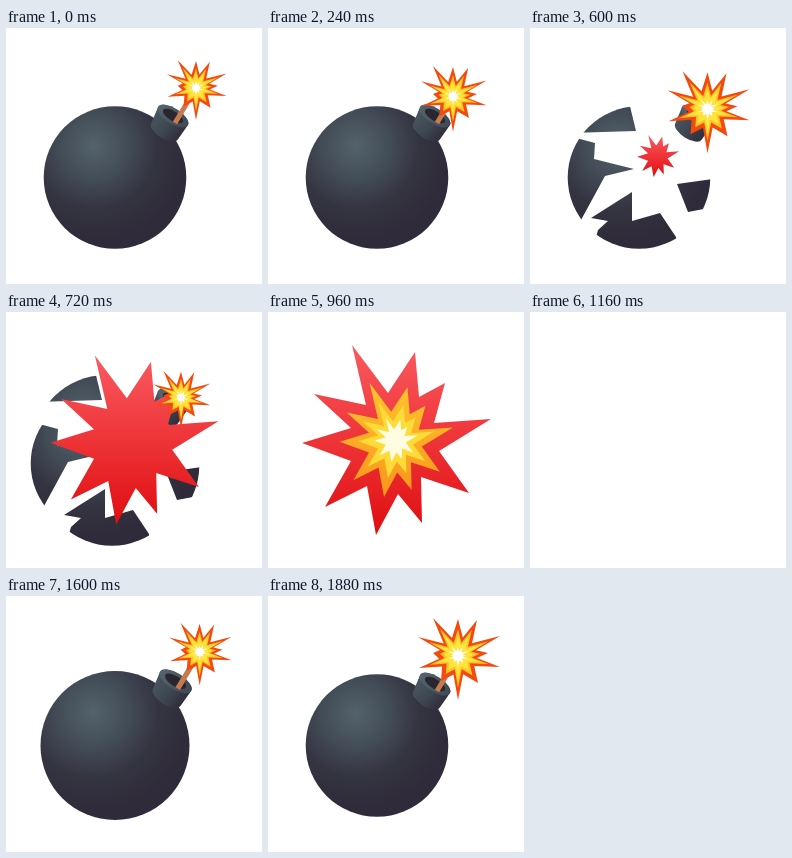
Animation, 256 px wide and 256 px high, one loop 1920 ms. Source, as an HTML page with a canvas:

```html
<!DOCTYPE html>
<html lang="en">
<head>
<meta charset="utf-8">
<title>Bomb</title>
<style>
  html, body { margin: 0; width: 100%; height: 100%; overflow: hidden; background: #fff; }
  canvas { display: block; width: 256px; height: 256px; }
</style>
</head>
<body>
<canvas id="stage" width="256" height="256"></canvas>
<script>
const ctx = document.getElementById('stage').getContext('2d');
const LOOP = 1920, STEP = 40;
const BOMB = { x: 109, y: 149.5, r: 71.3 };

// Outline of the blast, tips and notches in turn, around (0, 0).
const BLAST = [
  [-44, -95], [-8, -47], [19, -88], [23, -43], [49, -57], [38, -17],
  [95, -21], [43, 11], [73, 53], [25, 37], [26, 83], [2, 54],
  [-20, 95], [-29, 46], [-71, 67], [-45, 21], [-94, 3], [-45, -12],
  [-82, -46], [-30, -35]
];

const SPARK_TIPS = [
  [-25, -38], [0, -37], [19, -36], [42, -20], [30, -3], [42, 11],
  [20, 27], [0, 44], [-17, 25], [-39, 12], [-25, -3], [-40, -19]
];
// A notch lies between each pair of neighbouring tips.
const SPARK = SPARK_TIPS.flatMap((tip, i) => {
  const next = SPARK_TIPS[(i + 1) % SPARK_TIPS.length];
  const mx = tip[0] + next[0], my = tip[1] + next[1];
  const k = 19 / Math.hypot(mx, my);
  return [tip, [mx * k, my * k]];
});

// Shell fragments: outline at rest and drift per unit of time.
const PIECES = [
  { move: [-10, -15], shape: [[40, 105], [106, 103], [98, 70], [60, 70], [30, 90]] },
  { move: [-13, 2], shape: [[50, 111], [65, 115], [64, 131], [104, 141], [75, 148], [51, 192], [20, 190], [20, 110]] },
  { move: [-3, 13], shape: [[61, 190], [102, 164], [102, 193], [130, 185], [146, 209], [146, 230], [60, 230], [68, 202], [78, 193]] },
  { move: [13, 4], shape: [[147, 156], [190, 150], [190, 178], [158, 184]] }
];

// Piecewise linear value from [time, value] pairs.
function track(t, keys) {
  if (t <= keys[0][0]) return keys[0][1];
  for (let i = 1; i < keys.length; i++) {
    const [t0, a] = keys[i - 1], [t1, b] = keys[i];
    if (t <= t1) return a + (b - a) * (t - t0) / (t1 - t0);
  }
  return keys[keys.length - 1][1];
}

function gradient(g, ...colors) {
  colors.forEach((c, i) => g.addColorStop(i / (colors.length - 1), c));
  return g;
}

function trace(points) {
  ctx.beginPath();
  points.forEach(([x, y]) => ctx.lineTo(x, y));
  ctx.closePath();
}

function star(points, x, y, scale, fill) {
  if (scale <= 0) return;
  ctx.save();
  ctx.translate(x, y);
  ctx.scale(scale, scale);
  trace(points);
  ctx.fillStyle = fill;
  ctx.fill();
  ctx.restore();
}

const shellFill = gradient(ctx.createRadialGradient(88, 118, 2, 88, 118, 94),
  '#52616a', '#434d58', '#343441', '#302b3a');
const neckFill = gradient(ctx.createLinearGradient(150, 84, 177, 107),
  '#48565f', '#3d4752', '#2f2c3a');
const rimFill = gradient(ctx.createLinearGradient(152, 79, 182, 98), '#55646d', '#3f4954');
const blastFill = gradient(ctx.createLinearGradient(0, -95, 0, 95), '#fa5a60', '#ee3438', '#df0d10');
const orangeFill = gradient(ctx.createLinearGradient(0, -95, 0, 95), '#ffc52d', '#f9941c');

function shell() {
  ctx.beginPath();
  ctx.arc(BOMB.x, BOMB.y, BOMB.r, 0, 7);
  ctx.fillStyle = shellFill;
  ctx.fill();
}

function neck() {
  const tilt = 0.56;
  ctx.fillStyle = neckFill;
  ctx.beginPath();
  ctx.ellipse(167, 88, 17.5, 7.5, tilt, Math.PI, 0);
  ctx.ellipse(158.5, 103.5, 15.5, 7, tilt, 0, Math.PI);
  ctx.fill();
  const oval = (rx, ry, fill) => {
    ctx.beginPath();
    ctx.ellipse(167, 88, rx, ry, tilt, 0, 7);
    ctx.fillStyle = fill;
    ctx.fill();
  };
  oval(17.5, 7.8, rimFill);
  oval(11.5, 4.8, '#29262f');
}

function fuse([x, y]) {
  ctx.strokeStyle = '#c47b4f';
  ctx.lineWidth = 5;
  ctx.beginPath();
  ctx.moveTo(169, 95);
  ctx.lineTo(x, y);
  ctx.stroke();
}

function spark([x, y], scale) {
  star(SPARK, x, y, scale, '#f4490f');
  star(SPARK, x, y, scale * 0.72, '#ffc229');
  star(SPARK, x, y, scale * 0.56, '#ffe43c');
  star(SPARK, x, y, scale * 0.25, '#fff');
}

function fragments(t) {
  const drift = (t - 600) / 120;
  ctx.globalAlpha = track(t, [[840, 1], [960, 0]]);
  for (const { move, shape } of PIECES) {
    ctx.save();
    ctx.translate(move[0] * drift, move[1] * drift);
    trace(shape);
    ctx.clip();
    shell();
    ctx.restore();
  }
  neck();
  ctx.globalAlpha = 1;
}

function blast(t) {
  const size = track(t, [[560, 0], [740, 1], [960, 1], [1160, 0]]);
  const layer = (from, to, scale, fill) =>
    star(BLAST, 128, 128, size * track(t, [[from, 0], [to, scale]]), fill);
  star(BLAST, 128, 128, size, blastFill);
  layer(720, 840, 0.6, orangeFill);
  layer(760, 880, 0.4, '#ffdb38');
  layer(800, 920, 0.23, '#fffce2');
}

function draw(t) {
  ctx.clearRect(0, 0, 256, 256);
  const burn = t < 1200 ? t / 720 : 0;
  const tip = [190 - 15 * burn, 60 + 25.5 * burn];
  const pulse = track(t % 320, [[0, 0.73], [120, 0.2], [280, 1], [320, 0.73]]);

  if (t >= 600 && t < 1200) {
    if (t < 960) fragments(t);
    blast(t);
    spark(tip, track(t, [[600, 1], [720, 0.7], [840, 0]]));
    return;
  }
  const scale = t < 600 ? 1 : track(t, [[1320, 0], [1480, 1.18], [1640, 1]]);
  if (scale <= 0) return;
  ctx.save();
  ctx.translate(BOMB.x, BOMB.y);
  ctx.scale(scale, scale);
  ctx.translate(-BOMB.x, -BOMB.y);
  shell();
  neck();
  fuse(tip);
  spark(tip, pulse);
  ctx.restore();
}

const start = performance.now();
function tick() {
  const t = (performance.now() - start) % LOOP;
  draw(Math.floor(t / STEP) * STEP);
  requestAnimationFrame(tick);
}
tick();
</script>
</body>
</html>
```
